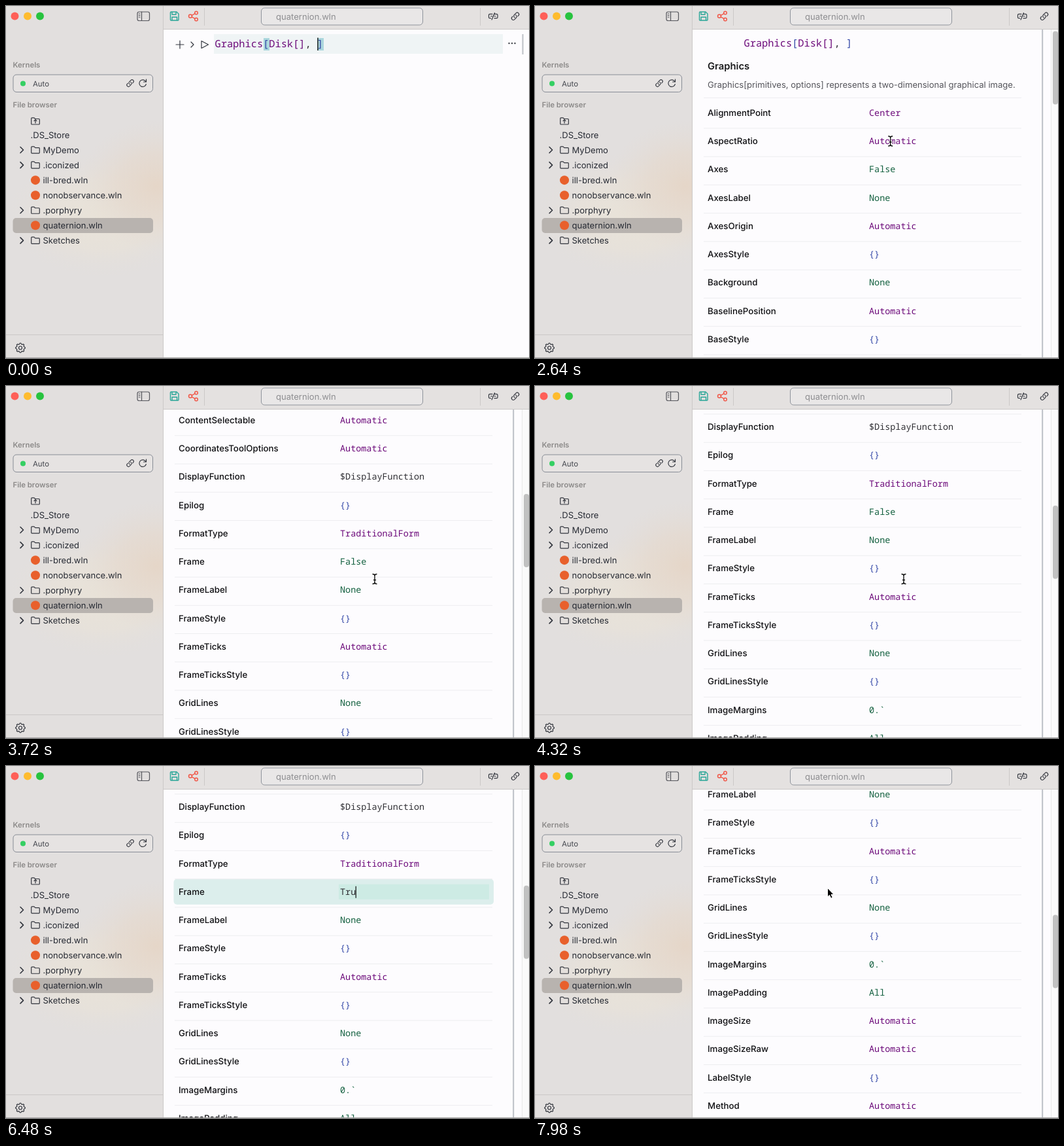
Recreate the animation shown at these times as an HTML page. Size 800 by 538 pixels, loop 8 s.

```html
<!DOCTYPE html>
<html lang="en">
<head>
<meta charset="utf-8">
<title>Notebook</title>
<style>
html, body { margin: 0; width: 100%; height: 100%; overflow: hidden; background: #fdfcfe; }
svg { display: block; width: 800px; height: 538px; }
text { font: 13.07px Inter, "Open Sans", sans-serif; white-space: pre; text-rendering: geometricPrecision; fill: #1c1c1e; }
.file { font-size: 13px; fill: #262a33; }
.kernel { font-size: 11.4px; fill: #44474e; }
.caption { font-size: 11.4px; font-weight: 600; fill: #8c8a89; }
.heading { font-size: 14.8px; font-weight: 600; }
.label { font-size: 13.3px; font-weight: 500; fill: #101013; }
.soft { fill: #55555b; }
.tab { fill: #8d8d90; }
.value { font: 13.45px "Noto Sans Mono", "DejaVu Sans Mono", monospace; }
.code { font: 15.33px "Noto Sans Mono", "DejaVu Sans Mono", monospace; }
.symbol { fill: #6c0a7a; }
.atom { fill: #13603f; }
.brace { fill: #3549a8; }
.plain { fill: #303035; }
.icon { fill: none; stroke: #33363e; stroke-width: 1.2; stroke-linecap: round; stroke-linejoin: round; }
.rule { stroke: #ededf0; }
.edge { stroke: #cbc8c7; fill: none; }
</style>
</head>
<body>
<svg viewBox="0 0 800 538">
  <defs>
    <radialGradient id="peach"><stop offset="0" stop-color="#e5d6c8"/><stop offset=".5" stop-color="#e5d9ce" stop-opacity=".7"/><stop offset="1" stop-color="#e4dcd5" stop-opacity="0"/></radialGradient>
    <radialGradient id="cream"><stop offset="0" stop-color="#e9e3d8"/><stop offset=".55" stop-color="#e8e2d9" stop-opacity=".75"/><stop offset="1" stop-color="#e3dfdc" stop-opacity="0"/></radialGradient>
    <clipPath id="side"><path d="M0 0H240V538H0Z"/></clipPath>
    <filter id="shadow" x="-10%" y="-30%" width="120%" height="170%"><feDropShadow dx="0" dy="3" stdDeviation="4" flood-opacity=".16"/></filter>
    <path id="chain" d="M13.19 8.69a4.5 4.5 0 0 1 1.24 7.24l-4.5 4.5a4.5 4.5 0 0 1-6.36-6.36l1.76-1.76m13.35-.62 1.76-1.76a4.5 4.5 0 0 0-6.37-6.36l-4.5 4.5a4.5 4.5 0 0 0 1.25 7.24"/>
    <path id="folder" d="M-6.3 4V-4.2Q-6.3-5.2-5.3-5.2H-2L-.3-3.5H5.3Q6.3-3.5 6.3-2.5V4Q6.3 5 5.3 5H-5.3Q-6.3 5-6.3 4Z"/>
    <path id="ibeam" d="M-3-7.5Q0-7.5 0-5Q0-7.5 3-7.5M0-5V5M-3 7.5Q0 7.5 0 5Q0 7.5 3 7.5M-1.5 1.5H1.5"/>
  </defs>

  <rect width="800" height="538" fill="#fdfcfe"/>

  <g id="page">
    <g id="focused">
      <rect x="318" y="43" width="442" height="30" fill="#eff4f5"/>
      <path d="M394 49h9v19h-9zM476 49h10v19h-10z" fill="#abd7dd"/>
      <path class="icon" d="M260 59H272M266 53V65M283 55L287 59L283 63M299 53.5V64.5L309.5 59Z"/>
      <path d="M790.5 43V74" stroke="#bcc0c6" stroke-width="2"/>
      <g fill="#44474d"><circle cx="769.5" cy="57" r="1.2"/><circle cx="774" cy="57" r="1.2"/><circle cx="778.5" cy="57" r="1.2"/></g>
    </g>
    <text class="code symbol" x="319.5" y="62.6">Graphics<tspan class="brace">[</tspan>Disk[]<tspan class="plain">, </tspan><tspan class="brace">]</tspan></text>
    <path id="caret" d="M477 48.5V68" stroke="#111" stroke-width="1.4"/>
    <g id="docs">
      <text class="heading" x="264" y="97.2">Graphics</text>
      <text class="soft" x="264" y="125">Graphics[primitives, options] represents a two-dimensional graphical image.</text>
      <path class="rule" d="M258 140.5H744"/>
      <rect id="hover" x="256.5" width="489.5" height="39" rx="5" fill="#dceeec"/>
      <rect id="field" x="509" width="230" height="23" fill="#cdebe4"/>
      <g id="rows"></g>
      <path id="fieldCaret" stroke="#111" stroke-width="1.2"/>
    </g>
  </g>

  <path id="bracket" d="M776.2 36V538" stroke="#bcc0c6" stroke-width="2"/>
  <g id="scrollbar">
    <path d="M789 36H800V538H789Z" fill="#fafafa"/>
    <path d="M789.5 36V538" stroke="#e8e8e8"/>
    <rect id="thumb" x="792" width="8" height="112" rx="4" fill="#c1c1c1"/>
  </g>

  <path d="M241 0H800V35.5H241Z" fill="#e4e1e0"/>
  <path class="edge" d="M241 35.5H800M303.5 3V30M725.5 3V30"/>
  <rect x="390.5" y="3" width="247" height="26" rx="5" fill="#e9e7e7" stroke="#8f949c"/>
  <text class="tab" x="413" y="20.5">quaternion.wln</text>
  <path class="icon" style="stroke:#27a596;stroke-width:1.4" d="M252.5 9H261L264 12V21Q264 22 263 22H252.5Q251.5 22 251.5 21V10Q251.5 9 252.5 9ZM254 9V13H260V9M254 22V17H261.5V22"/>
  <g class="icon" style="stroke:#f05a4b;stroke-width:1.5">
    <circle cx="282" cy="15.5" r="2.5"/><circle cx="291" cy="10.5" r="2.3"/><circle cx="291" cy="20.5" r="2.3"/>
    <path d="M284.2 14.3L288.9 11.7M284.2 16.7L288.9 19.3"/>
  </g>
  <g class="icon">
    <path d="M744 12.3H740Q738.5 12.3 738.5 13.8V17.2Q738.5 18.7 740 18.7H741.5M746.5 12.3H750.5Q752 12.3 752 13.8V17.2Q752 18.7 750.5 18.7H747M741.5 15.5H743.5M747 15.5H749M743 21L747.5 10.5"/>
    <use href="#chain" transform="translate(772 8.8) scale(.58)" stroke-width="2"/>
  </g>

  <g clip-path="url(#side)">
    <rect width="240" height="538" fill="#e2dfde"/>
    <ellipse cx="150" cy="320" rx="150" ry="95" fill="url(#cream)"/>
    <ellipse cx="230" cy="275" rx="120" ry="100" fill="url(#peach)"/>
  </g>
  <path class="edge" d="M240.5 0V538M0 502.5H240"/>
  <circle cx="13.5" cy="15.5" r="6" fill="#fe5f57"/>
  <circle cx="33" cy="15.5" r="6" fill="#febc2e"/>
  <circle cx="52" cy="15.5" r="6" fill="#28c33f"/>
  <g class="icon" style="stroke:#55565c">
    <rect x="201" y="9" width="18.5" height="13.5" rx="2.5"/><path d="M207.5 9V22.5M203.3 12H205M203.3 14.5H205M203.3 17H205"/>
  </g>
  <text class="caption" x="10.5" y="93.5">Kernels</text>
  <rect x="11" y="105" width="213.5" height="26.5" rx="5" fill="#fff" fill-opacity=".12" stroke="#888d96"/>
  <circle cx="26" cy="118.5" r="4" fill="#35cf63"/>
  <text class="kernel" x="41" y="122.5">Auto</text>
  <g class="icon">
    <use href="#chain" transform="translate(183.5 111.5) scale(.54)" stroke-width="2"/>
    <path d="M213.8 115.5A5.3 5.3 0 1 0 214.3 119.5M214.5 112V116H210.5"/>
  </g>
  <text class="caption" x="10.5" y="155">File browser</text>
  <rect x="10.5" y="324" width="214.5" height="23" rx="5" fill="#b8b3af"/>
  <g class="icon"><use href="#folder" x="45" y="176"/><path d="M45 179V174M43 175.7L45 173.7L47 175.7"/></g>
  <g id="files"></g>
  <g class="icon"><path id="gear"/><circle cx="22" cy="522.5" r="2.5"/></g>
  <path d="M0 537.5H800" stroke="#aaa8a8"/>

  <g id="notice">
    <rect x="472" y="43" width="308" height="65.5" rx="6" fill="#fff" filter="url(#shadow)"/>
    <text class="label" x="484" y="68.7">Print</text>
    <text class="soft" x="484" y="92">&gt;&gt; "Subscribe!"</text>
    <path class="icon" d="M754 71.5L763 80.5M763 71.5L754 80.5" style="stroke:#77777c"/>
  </g>

  <g id="mouse">
    <g id="beam" fill="none" stroke-linecap="round">
      <use href="#ibeam" stroke="#fff" stroke-width="3.2"/>
      <use href="#ibeam" stroke="#111" stroke-width="1.4"/>
    </g>
    <path id="arrow" d="M-.5-6.5V7L2.5 4.3L4.8 9.3L7.2 8.2L5 3.5H9Z" fill="#000" stroke="#fff"/>
  </g>
</svg>

<script>
const LOOP = 8000, ROW = 43.25, FIRST = 164, BASELINE = 4.2, VALUE_X = 511, CHAR = 8.07;
const $ = id => document.getElementById(id);
const show = (id, on) => { $(id).style.display = on ? '' : 'none'; };
const clamp = v => Math.min(1, Math.max(0, v));
const progress = (t, a, b) => clamp((t - a) / (b - a));
const smooth = p => p * p * (3 - 2 * p);

function add(parent, tag, attrs, content = '') {
  const el = document.createElementNS('http://www.w3.org/2000/svg', tag);
  for (const key in attrs) el.setAttribute(key, attrs[key]);
  el.textContent = content;
  parent.appendChild(el);
  return el;
}

const shorthand = { A: 'Automatic', N: 'None', F: 'False', B: '{}' };
const options = `AlignmentPoint Center,AspectRatio A,Axes F,AxesLabel N,AxesOrigin A,AxesStyle B,
Background N,BaselinePosition A,BaseStyle B,ColorOutput A,ContentSelectable A,CoordinatesToolOptions A,
DisplayFunction $DisplayFunction,Epilog B,FormatType TraditionalForm,Frame F,FrameLabel N,FrameStyle B,
FrameTicks A,FrameTicksStyle B,GridLines N,GridLinesStyle B,ImageMargins 0.\`,ImagePadding All,
ImageSize A,ImageSizeRaw A,LabelStyle B,Method A`.split(/,\s*/).map(s => s.split(' '));

function valueClass(value) {
  if (/^(None|False|True|All|0.*)$/.test(value)) return 'atom';
  if (value === '{}') return 'brace';
  return /^(Automatic|Center|TraditionalForm)$/.test(value) ? 'symbol' : 'plain';
}

const rowY = i => FIRST + i * ROW;
const values = options.map(([name, short], i) => {
  const y = rowY(i), value = shorthand[short] || short;
  add($('rows'), 'path', { class: 'rule', d: `M258 ${y + 23.2}H744` });
  add($('rows'), 'text', { class: 'label', x: 264, y: y + BASELINE }, name);
  return add($('rows'), 'text', { class: 'value ' + valueClass(value), x: VALUE_X, y: y + BASELINE }, value);
});
const FRAME = options.findIndex(([name]) => name === 'Frame');

['.DS_Store', 'MyDemo/', '.iconized/', 'ill-bred.wln', 'nonobservance.wln', '.porphyry/', 'quaternion.wln', 'Sketches/']
  .forEach((name, i) => {
    const y = 197 + i * 23.05, folder = name.endsWith('/'), files = $('files');
    add(files, 'text', { class: 'file', x: i ? 56.5 : 37.5, y: y + 4.7 }, name.replace('/', ''));
    if (folder) {
      add(files, 'path', { class: 'icon', d: `M22 ${y - 4.5}L26.5 ${y}L22 ${y + 4.5}`, style: 'stroke-width:1.6' });
      add(files, 'use', { class: 'icon', href: '#folder', x: 45, y });
    } else if (i) add(files, 'circle', { cx: 45, cy: y, r: 7, fill: '#e8602c' });
  });

const teeth = Array.from({ length: 32 }, (_, i) => {
  const a = (i - .5) * Math.PI / 16, r = i % 4 < 2 ? 7.3 : 5.8;
  return `${22 + r * Math.cos(a)} ${522.5 + r * Math.sin(a)}`;
});
$('gear').setAttribute('d', `M${teeth.join('L')}Z`);

// Each stop: time, x, y. The pointer rests between equal positions.
const path = [[1020, 528, 92], [1260, 511, 64], [2560, 511, 64], [2700, 564, 295], [4500, 564, 295],
  [5040, 533, 190], [6780, 533, 190], [7080, 448, 193], [8000, 448, 193]];

function pointerAt(t) {
  const i = path.findIndex(stop => stop[0] > t);
  if (i < 1) return path[0].slice(1);
  const [a, b] = [path[i - 1], path[i]], p = smooth(progress(t, a[0], b[0]));
  return [a[1] + (b[1] - a[1]) * p, a[2] + (b[2] - a[2]) * p];
}

function scrollAt(t) {
  const p = progress(t, 2640, 3180), q = progress(t, 3180, 4200), r = progress(t, 7440, 7980);
  return 275 * p * (.5 + .5 * p) + 345 * (1 - (1 - q) ** 2) + 192 * smooth(r);
}

function typed(t) {
  if (t < 6300) return 'False'.slice(0, 5 - Math.max(0, Math.floor((t - 5940) / 60)));
  return 'True'.slice(0, Math.floor((t - 6300) / 80) + 1);
}

function render(t) {
  const open = t >= 960, scroll = scrollAt(t), [x, y] = pointerAt(t);
  show('focused', !open);
  show('caret', !open && t % 1200 < 600);
  show('docs', open);
  show('scrollbar', open);
  show('bracket', t >= 2600);
  $('page').setAttribute('transform', `translate(0 ${-scroll})`);
  $('thumb').setAttribute('y', 38.5 + scroll * .2328);

  show('notice', t >= 960 && t < 2340);
  $('notice').style.opacity = progress(t, 960, 1120) * (1 - progress(t, 2180, 2340));

  const row = Math.round((y + scroll - FIRST) / ROW);
  show('hover', t >= 4500 && t < 7440);
  $('hover').setAttribute('y', rowY(row) - 20);

  const editing = t >= 5280 && t < 6840, text = typed(t);
  show('field', editing);
  $('field').setAttribute('y', rowY(FRAME) - 12);
  values[FRAME].textContent = text;
  values[FRAME].setAttribute('class', 'value ' + valueClass(text));
  const caretX = VALUE_X + CHAR * (t < 5940 ? 3 : text.length);
  show('fieldCaret', editing && (t >= 5940 || t < 5880));
  $('fieldCaret').setAttribute('d', `M${caretX} ${rowY(FRAME) - 9}v18`);

  show('mouse', t >= 1020 && (t < 5940 || t >= 6780));
  show('beam', x >= 509);
  show('arrow', x < 509);
  $('mouse').setAttribute('transform', `translate(${x} ${y})`);
}

const start = performance.now();
function tick() {
  render((performance.now() - start) % LOOP);
  requestAnimationFrame(tick);
}
tick();
</script>
</body>
</html>
```
